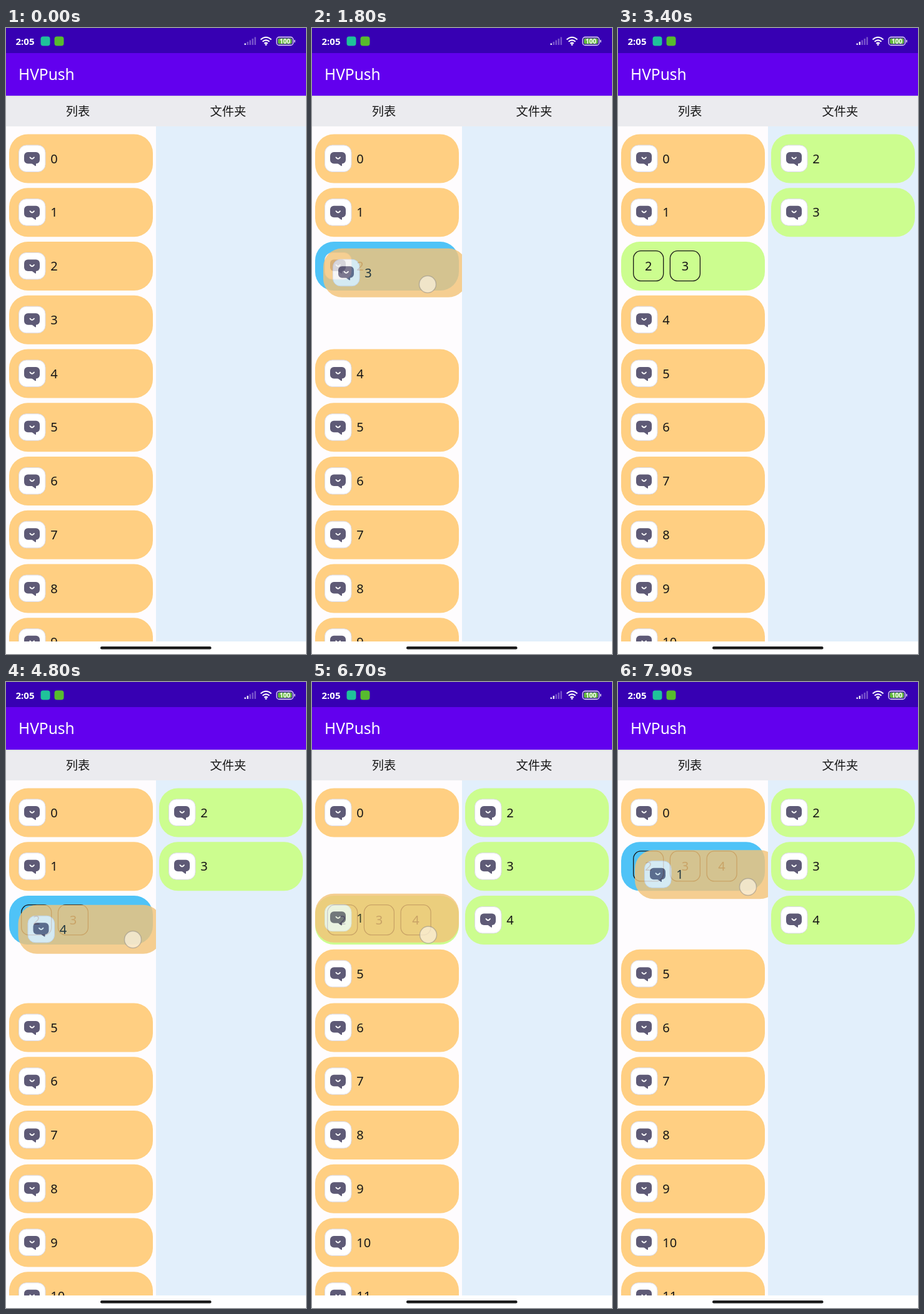
Animation of 480x999 px, one loop 8 s. Source, as an HTML page:

```html
<!DOCTYPE html>
<html lang="zh">
<head>
<meta charset="utf-8">
<title>Drag to folder</title>
<style>
  html, body { margin: 0; width: 100%; height: 100%; overflow: hidden; background: #fefcfe; }
  svg { display: block; width: 480px; height: 999px; font: 20px "Noto Sans", "Noto Sans CJK SC", "Noto Sans CJK", sans-serif; fill: #161616; }
  .mid { text-anchor: middle; }
  .tab { font-size: 19.2px; font-family: "Noto Sans CJK SC", "Noto Sans CJK", sans-serif; }
</style>
</head>
<body>
<svg viewBox="0 0 480 999">
  <defs>
    <clipPath id="leftClip"><path d="M0 157H240V979H0z"/></clipPath>
  </defs>

  <path fill="#fefcfe" d="M0 0H480V999H0z"/>
  <path fill="#e2effb" d="M240 157H480V979H240z"/>
  <g id="left" clip-path="url(#leftClip)"></g>
  <g id="right"></g>

  <path fill="#ebebef" d="M0 108H480V157H0z"/>
  <path fill="#dcdbe2" d="M0 108H480V109.5H0z"/>
  <text class="mid tab" x="115" y="140">列表</text>
  <text class="mid tab" x="355.3" y="140">文件夹</text>

  <path fill="#6200ee" d="M0 40H480V108H0z"/>
  <text x="20" y="83" fill="#fff" font-size="24.5" font-weight="500">HVPush</text>

  <path fill="#3700b3" d="M0 0H480V40H0z"/>
  <text x="15.5" y="26.5" fill="#fff" font-size="15" font-weight="600">2:05</text>
  <rect x="55.5" y="13.5" width="15" height="15" rx="4" fill="#1fc29a"/>
  <rect x="77.5" y="13.5" width="15" height="15" rx="4" fill="#57bb2e"/>
  <g id="signal" fill="#fff"></g>
  <g fill="none" stroke="#fff" stroke-width="2">
    <path d="M407.5 18.5q8.5-7.5 17 0M410.5 21.8q5.500-4.800 11 0M413.200 24.800q2.800-2.400 5.600 0"/>
    <circle cx="416" cy="26.500" r=".6"/>
  </g>
  <rect x="433" y="14.500" width="26.500" height="13" rx="4" fill="none" stroke="#e9e2f7" stroke-width="1.300"/>
  <rect x="435" y="16.500" width="22.500" height="9" rx="2" fill="#62b83c"/>
  <path d="M461.800 19v4" stroke="#e9e2f7" stroke-width="1.500"/>
  <text class="mid" x="446.300" y="24.700" fill="#fff" font-size="10" font-weight="600">100</text>

  <path fill="#fff" d="M0 979H480V999H0z"/>
  <rect x="151" y="987" width="177.500" height="4.500" rx="2.200" fill="#1b1b1b"/>
  <g id="touch"></g>
</svg>

<script>
const LOOP = 8000, STEP = 100;
const ORANGE = '#ffcf82', GREEN = '#ccfd8f', BLUE = '#4fc3f7';
const el = id => document.getElementById(id);
const clamp = v => Math.max(0, Math.min(1, v));
const progress = (t, start, length) => clamp((t - start) / length);
const rowY = row => 169.5 + 85.75 * row;

// Each path point is [time, dx, dy], relative to the row where the drag began.
const drags = [
  { item: 3, row: 3, down: 1100, start: 1500, end: 2400, up: 2500, grab: [172, 484],
    path: [[1500, 0, -2.5], [1600, 2, -20], [1700, 7, -50], [1800, 13, -75], [1900, 17, -89]] },
  { item: 4, row: 3, down: 4200, start: 4500, end: 5100, up: 5200, grab: [188.5, 482],
    path: [[4500, 0, -1], [4700, 4, -22], [4800, 14.5, -71], [4900, 16, -79], [5000, 16, -82]] },
  { item: 1, row: 1, down: 6000, start: 6400, end: LOOP, up: LOOP, grab: [186, 321],
    path: [[6400, 0, 2], [6500, 0, 25], [6600, 0, 58], [6700, 0, 82.5], [6800, 1, 96],
           [7000, 2, 104], [7200, 4, 106], [7400, 8, 94], [7600, 14, 58], [7800, 20, 22], [7900, 22, 13]] }
];

function sample(path, t) {
  let i = 1;
  while (i < path.length - 1 && path[i][0] < t) i++;
  const [a, b] = [path[i - 1], path[i]];
  const k = progress(t, a[0], b[0] - a[0]);
  return [a[1] + (b[1] - a[1]) * k, a[2] + (b[2] - a[2]) * k];
}

const group = (x, y, alpha, body) =>
  alpha > 0 ? `<g transform="translate(${x} ${y})" opacity="${alpha}">${body}</g>` : '';
const pill = fill => `<rect width="230" height="78" rx="30" fill="${fill}"/>`;

function card(label, x, y, fill, alpha = 1, paper = '#fff') {
  return group(x, y, alpha, pill(fill) +
    `<rect x="15.5" y="17.5" width="42.500" height="42.500" rx="12" fill="${paper}" stroke="#dad9e6"/>
     <rect x="24" y="28.500" width="25" height="18.500" rx="6" fill="#5e5a76"/>
     <path d="M36 46.500l5.500 4q1.500 1 1.500-1v-3.500z" fill="#5e5a76"/>
     <path d="M33.500 37q3.200 4.500 6.400 0" fill="none" stroke="${paper}" stroke-width="2" stroke-linecap="round"/>
     <text x="66.300" y="46">${label}</text>`);
}

function folder(y, fill, alpha, fourthAlpha) {
  const box = (label, i, opacity) => group(19.7 + 58.7 * i, 14.7, opacity,
    `<rect width="48" height="48" rx="12" fill="none" stroke="#161616" stroke-width="1.300"/>
     <text class="mid" x="24" y="31.300">${label}</text>`);
  return group(5, y, alpha, pill(fill) + box(2, 0, 1) + box(3, 1, 1) + box(4, 2, fourthAlpha));
}

function render(t) {
  const merge1 = progress(t, 2400, 200), merge2 = progress(t, 5100, 300);
  const fade = m => clamp(2 * m), shift = m => clamp(2 * m - 1);
  const swap = progress(t, 6800, 200);
  const drag = drags.find(d => t >= d.start && t < d.end);
  const [dx, dy] = drag ? sample(drag.path, t) : [0, 0];
  const dragY = drag ? rowY(drag.row) + dy : 0;

  const folderY = rowY(2 - swap);
  const hovering = drag && (drag.item === 1 ? swap === 1 && dragY < folderY + 45 : dy < -55);
  const alphas = { 2: 1 - fade(merge1), 3: 1 - fade(merge1), 4: 1 - fade(merge2) };
  let list = '';
  for (let n = 0; n < 12; n++) {
    if (drag && drag.item === n) continue;
    const row = n - (n > 3 ? shift(merge1) : 0) - (n > 4 ? shift(merge2) : 0);
    const fill = n === 2 && hovering ? BLUE : ORANGE;
    list += card(n, 5, rowY(row), fill, alphas[n] ?? 1);
  }
  list += folder(folderY, hovering ? BLUE : GREEN, fade(merge1), fade(merge2));
  if (drag) list += card(drag.item, 5 + dx, dragY, '#f3c479', 0.81, '#f3f3f3');
  el('left').innerHTML = list;

  const opened = progress(t, 3100, 300);
  el('right').innerHTML = [2, 3, 4].map((n, i) =>
    card(n, 245, rowY(i), GREEN, n === 4 ? fade(merge2) : opened)).join('');

  const press = drags.find(d => t >= d.down && t < d.up);
  if (press) {
    const [x, y] = t < press.start ? [0, 0] : sample(press.path, t);
    el('touch').innerHTML = `<circle cx="${press.grab[0] + x}" cy="${press.grab[1] + y - 7 * swap}" r="13.500"
      fill="#fbf3df" fill-opacity=".72" stroke="#8d8a85" stroke-opacity=".5" stroke-width="1.500"/>`;
  } else el('touch').innerHTML = '';

  const lit = t < 3400 ? 1 : 2;
  el('signal').innerHTML = [0, 1, 2, 3, 4].map(i =>
    `<rect x="${381.5 + 4 * i}" y="${24.5 - 2.5 * i}" width="2.300" height="${2.5 + 2.5 * i}" opacity="${i < lit ? 0.95 : 0.35}"/>`).join('');
}

let shown = -1;
function tick() {
  const t = Math.floor(performance.now() % LOOP / STEP) * STEP;
  if (t !== shown) render(shown = t);
  requestAnimationFrame(tick);
}
tick();
</script>
</body>
</html>
```
